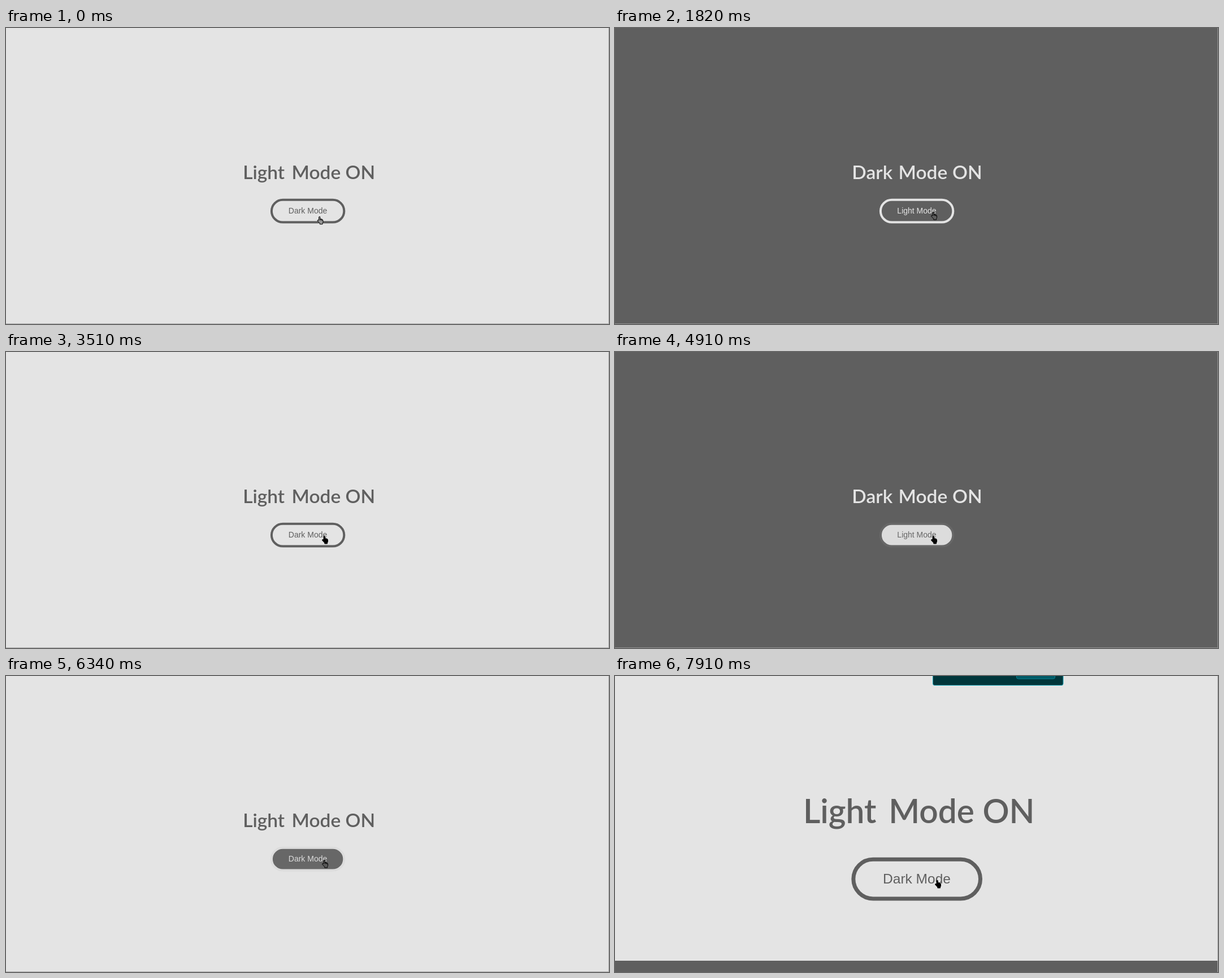
Animation of 1067x525 px, one loop 8000 ms. Source, as an HTML page with a canvas:

```html
<!DOCTYPE html>
<html lang="en">
<head>
<meta charset="utf-8">
<title>Light and dark mode</title>
<style>
  html, body { margin: 0; width: 100%; height: 100%; overflow: hidden; background: #e4e4e4; }
  canvas { display: block; }
</style>
</head>
<body>
<canvas id="stage" width="1067" height="525"></canvas>
<script>
const ctx = document.getElementById('stage').getContext('2d');
const LOOP = 8000, LIGHT = 228, DARK = 95;
const CENTER = { x: 534, y: 277.5 };

// Most theme changes hang for a moment partway through
const flips = [{ at: 1480, stalls: true }, { at: 3160, stalls: true }, { at: 4910, stalls: false }, { at: 6340, stalls: true }];
const away = [[410, 870], [6760, 7690]];
const zooms = [[0, 1], [7140, 1.1], [7380, 1.25], [7590, 1.5], [7800, 1.75]];

// Pointer tip: time, x, y
const pointerPath = [
  [290, 553.5, 334], [410, 554, 347], [590, 556, 373], [700, 558, 373],
  [870, 561, 346], [990, 562, 326], [6660, 562, 326], [6930, 569, 362]
];

// Each word sits on its own centre, relative to the zoom centre
const headings = [
  [['Light', -77], ['Mode', 15.5], ['ON', 92]],
  [['Dark', -77.5], ['Mode', 11.5], ['ON', 88.5]]
];

const hand = new Path2D('M.1 1.4Q.2 .5 1.3 .5Q2.4 .5 2.4 1.4V4.4L6.2 5.4Q7.5 6 7.5 8V10.6L6.6 12.4V14H1.8V12.4L-2.2 8.2Q-2.8 6.2-.8 6.4L.1 7.2Z');
const knuckles = new Path2D('M2.4 4.4V7M4.2 5V7.4M5.9 5.6V7.8');
const arrow = new Path2D('M0 0V11.2L2.6 8.8L4.3 12.5L5.9 11.8L4.3 8.2H7.8Z');

const mix = (a, b, p) => a + (b - a) * p;
const clamp = x => Math.min(1, Math.max(0, x));
const gray = v => `rgb(${v},${v},${v})`;

// CSS "ease": cubic-bezier(.25, .1, .25, 1)
function ease(x) {
  if (x <= 0) return 0;
  if (x >= 1) return 1;
  const bezier = (a, b, s) => 3 * a * s * (1 - s) ** 2 + 3 * b * s * s * (1 - s) + s ** 3;
  let lo = 0, hi = 1;
  for (let i = 0; i < 16; i++) {
    const mid = (lo + hi) / 2;
    if (bezier(.25, .25, mid) < x) lo = mid; else hi = mid;
  }
  return bezier(.1, 1, lo);
}

const transition = (t, start) => ease((t - start) / 200);

function themeAt(t) {
  const passed = flips.filter(f => t >= f.at);
  const dark = passed.length % 2;
  if (!passed.length) return { dark, blend: 0 };
  const { at, stalls } = passed.at(-1);
  let elapsed = t - at;
  if (stalls && elapsed > 80) elapsed = elapsed < 280 ? 80 : elapsed - 140;
  const p = ease((elapsed + 14) / 200);
  return { dark, blend: dark ? p : 1 - p };
}

function pointerAt(t) {
  const next = pointerPath.findIndex(k => k[0] > t);
  if (next === 0) return pointerPath[0].slice(1);
  if (next < 0) return pointerPath.at(-1).slice(1);
  const [t0, x0, y0] = pointerPath[next - 1], [t1, x1, y1] = pointerPath[next];
  const p = clamp((t - t0) / (t1 - t0));
  return [mix(x0, x1, p), mix(y0, y1, p)];
}

function drawHeading(dark) {
  ctx.fillStyle = gray(dark ? LIGHT : DARK);
  ctx.font = '600 33.5px Lato, sans-serif';
  ctx.textAlign = 'left';
  for (const [word, x] of headings[dark]) {
    const box = ctx.measureText(word);
    ctx.fillText(word, x - (box.actualBoundingBoxRight - box.actualBoundingBoxLeft) / 2, -9.5);
  }
}

function drawButton(dark, blend, hover) {
  const back = mix(LIGHT, DARK, blend), front = mix(DARK, LIGHT, blend);
  ctx.beginPath();
  ctx.roundRect(-64.1, 27.3, 128.4, 39.8, 19.9);
  ctx.fillStyle = gray(mix(front, back, hover));
  ctx.fill();
  ctx.strokeStyle = gray(front);
  ctx.lineWidth = 4;
  ctx.stroke();
  ctx.fillStyle = gray(mix(back, front, hover));
  ctx.font = '14px "Liberation Sans", Arial, sans-serif';
  ctx.textAlign = 'center';
  ctx.fillText(dark ? 'Light Mode' : 'Dark Mode', 0, 51.5);
}

function drawPointer(t, isAway, blend) {
  const shape = isAway ? arrow : hand;
  ctx.save();
  ctx.translate(...pointerAt(t));
  ctx.fillStyle = isAway ? '#fff' : gray(t < 290 ? 150 : DARK * blend);
  ctx.strokeStyle = '#000';
  ctx.lineWidth = 1;
  ctx.lineJoin = 'round';
  ctx.fill(shape);
  ctx.stroke(shape);
  if (!isAway) ctx.stroke(knuckles);
  ctx.restore();
}

function drawZoomPopup() {
  const panel = (x, y, w, h, fill, line) => {
    ctx.beginPath();
    ctx.roundRect(x, y, w, h, 3);
    ctx.fillStyle = fill;
    ctx.strokeStyle = line;
    ctx.lineWidth = 1;
    ctx.fill();
    ctx.stroke();
  };
  panel(562.5, -20.5, 230.5, 37, '#00363b', '#0fa5b8');
  panel(710.5, -20.5, 68, 25.5, '#005a67', '#0a8291');
}

function draw(t) {
  const { dark, blend } = themeAt(t);
  const isAway = away.some(([from, to]) => t >= from && t < to);
  const hover = away.reduce((h, [from, to]) => h - transition(t, from) + transition(t, to), 1);
  const zoom = zooms.filter(z => t >= z[0]).at(-1)[1];

  ctx.fillStyle = gray(dark ? DARK : LIGHT);
  ctx.fillRect(0, 0, 1067, 525);
  ctx.fillStyle = dark ? '#909090' : '#a8a8a8';
  ctx.fillRect(1066, 0, 1, 525);
  ctx.fillRect(0, 524, 1067, 1);

  ctx.save();
  ctx.translate(CENTER.x, CENTER.y);
  ctx.scale(zoom, zoom);
  drawHeading(dark);
  drawButton(dark, blend, hover);
  ctx.restore();

  if (zoom === 1.75) {
    ctx.fillStyle = gray(DARK);
    ctx.fillRect(0, 505, 1066, 20);
  }
  if (t >= 7170) drawZoomPopup();
  drawPointer(t, isAway, blend);
}

const start = performance.now();
function tick() {
  draw((performance.now() - start) % LOOP);
  requestAnimationFrame(tick);
}
tick();
</script>
</body>
</html>
```
